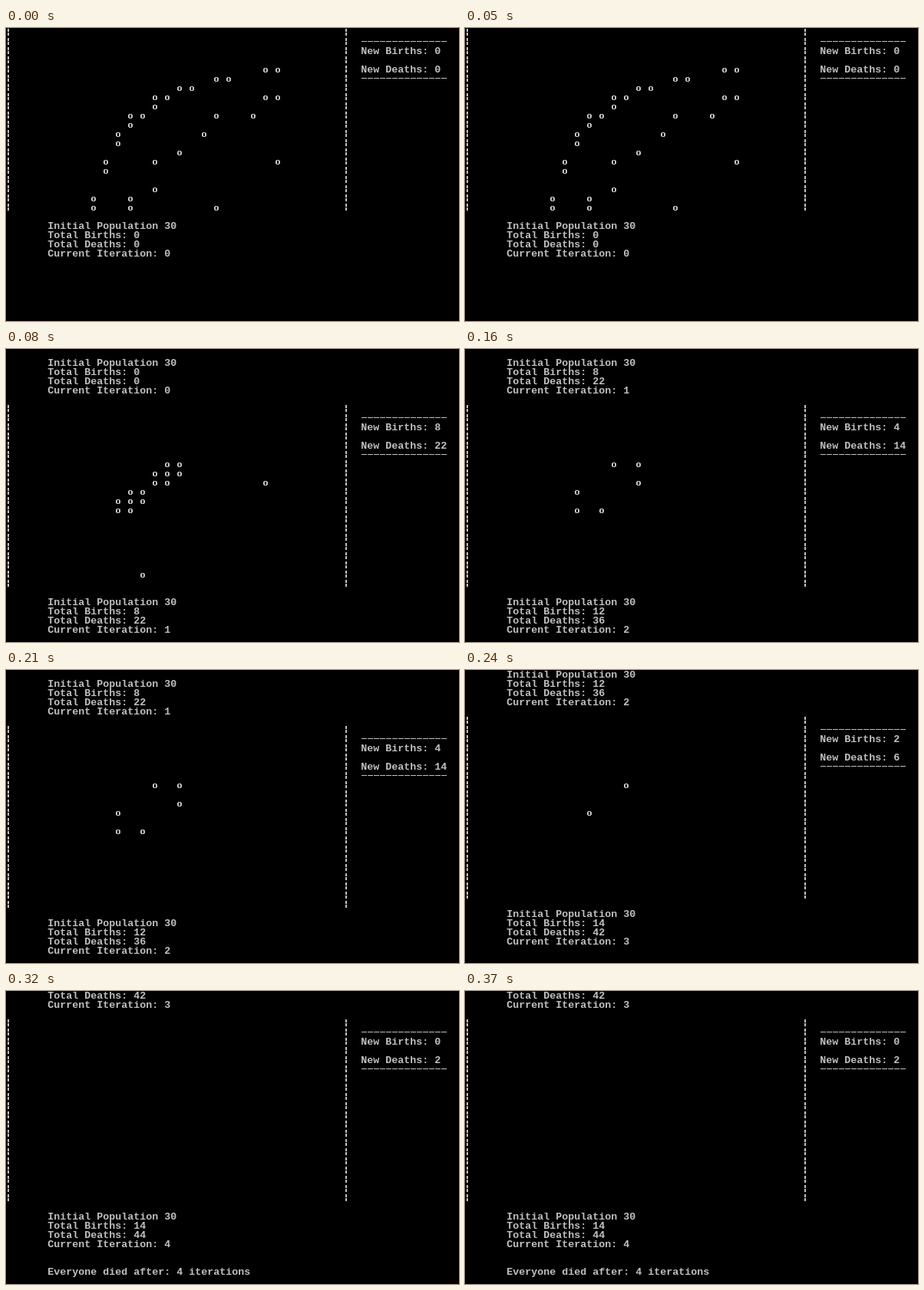
Recreate the animation shown at these times as an HTML page. Size 590 by 382 pixels, loop 0.4 s.

```html
<!DOCTYPE html>
<html lang="en">
<head>
<meta charset="utf-8">
<title>Life in a console</title>
<style>
  html, body { margin: 0; width: 100%; height: 100%; overflow: hidden; background: #000; }
  svg { display: block; fill: #c0c0c0; }
  text { font: bold 13.333px "Liberation Mono", "Courier New", monospace; white-space: pre; }
  path { shape-rendering: crispEdges; fill-rule: evenodd; }
  .screen { visibility: hidden; animation: show 400ms step-end infinite; }
  @keyframes show {
    0% { visibility: visible; }
    20%, 100% { visibility: hidden; }
  }
</style>
</head>
<body>
<svg id="stage" width="590" height="382" viewBox="0 0 590 382"></svg>
<script>
  const CW = 8, CH = 12, LEFT = -1, ROWS = 20, COLS = 27, STEP = 80;
  const gridTops = [0, 6, 6, 5, 3]; // console row where the board starts

  // Living columns by row
  const seed = {
    4: [21, 22], 5: [17, 18], 6: [14, 15], 7: [12, 13, 21, 22], 8: [12],
    9: [10, 11, 17, 20], 10: [10], 11: [9, 16], 12: [9], 13: [14],
    14: [8, 12, 22], 15: [8], 17: [12], 18: [7, 10], 19: [7, 10, 17]
  };

  const at = (col, row) => [LEFT + col * CW, row * CH];

  function label(col, row, str) {
    const [x, y] = at(col, row);
    return `<text x="${x - 0.8}" y="${y + 10}">${str}</text>`;
  }

  function cell(col, row) {
    const [x, y] = at(col, row);
    return `M${x + 1} ${y + 4}h4v1h1v4h-1v1h-4v-1h-1v-4h1zm1 1v4h2v-4z`;
  }

  function bar(col, row) {
    const [x, y] = at(col, row);
    return `M${x + 3} ${y + 1}h2v4h-2zm0 5h2v4h-2z`;
  }

  function rule(col, row, count) {
    const [x, y] = at(col, row);
    return `M${x} ${y + 5}` + "h7v1h-7zm8 0".repeat(count);
  }

  function next(alive) {
    const born = new Set(), kept = new Set();
    for (let r = 0; r < ROWS; r++) {
      for (let c = 0; c < COLS; c++) {
        let n = 0;
        for (let dr = -1; dr <= 1; dr++)
          for (let dc = -1; dc <= 1; dc++)
            if ((dr || dc) && alive.has(`${r + dr},${c + dc}`)) n++;
        const key = `${r},${c}`;
        if (alive.has(key)) {
          if (n === 2 || n === 3) kept.add(key);
        } else if (n === 3) born.add(key);
      }
    }
    return { alive: new Set([...kept, ...born]), births: born.size, deaths: alive.size - kept.size };
  }

  const stats = (lines, row) => lines.map((s, i) => label(7, row + i, s)).join("");

  function screen(i, top, alive, births, deaths, before, now) {
    let d = rule(58, top + 1, 14) + rule(58, top + 5, 14);
    for (let r = 0; r < ROWS; r++) d += bar(0, top + r) + bar(55, top + r);
    for (const key of alive) {
      const [r, c] = key.split(",").map(Number);
      d += cell(2 * c, top + r);
    }
    let out = `<path d="${d}"/>` +
      label(58, top + 2, `New Births: ${births}`) +
      label(58, top + 4, `New Deaths: ${deaths}`) +
      stats(before, top - 5) + stats(now, top + 21);
    if (!alive.size) out += label(7, top + 27, `Everyone died after: ${i} iterations`);
    const delay = (i - gridTops.length) * STEP;
    return `<g class="screen" style="animation-delay:${delay}ms">${out}</g>`;
  }

  let alive = new Set(Object.entries(seed).flatMap(([r, cols]) => cols.map(c => `${r},${c}`)));
  const initial = alive.size;
  let births = 0, deaths = 0, born = 0, died = 0, before = [], html = "";

  gridTops.forEach((top, i) => {
    if (i) {
      ({ alive, births, deaths } = next(alive));
      born += births;
      died += deaths;
    }
    const now = [
      `Initial Population ${initial}`,
      `Total Births: ${born}`,
      `Total Deaths: ${died}`,
      `Current Iteration: ${i}`
    ];
    html += screen(i, top, alive, births, deaths, before, now);
    before = now;
  });
  document.getElementById("stage").innerHTML = html;
</script>
</body>
</html>
```
